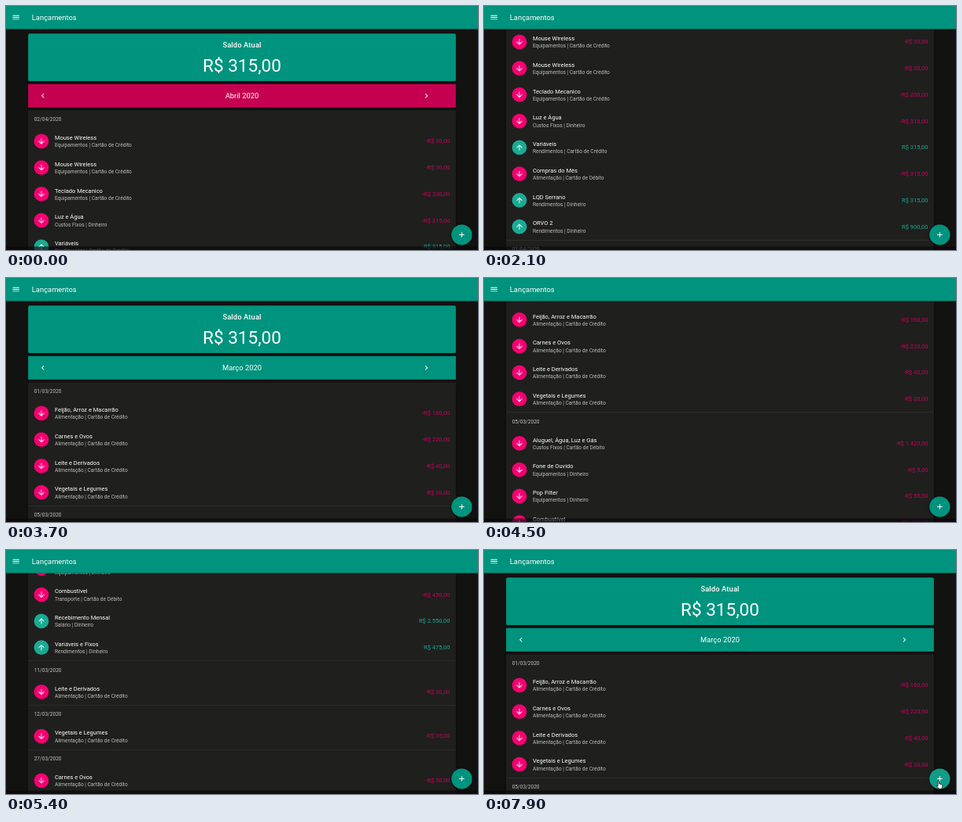
An HTML page for the animation above (8000 ms loop, 600x312 px).

```html
<!DOCTYPE html>
<html lang="pt-BR">
<head>
<meta charset="utf-8">
<title>Lançamentos</title>
<style>
  html, body { margin: 0; width: 100%; height: 100%; overflow: hidden; background: #121211; }
  #app { position: absolute; left: 0; top: 0; width: 1280px; height: 665.6px; overflow: hidden;
    transform: scale(.46875); transform-origin: 0 0; background: #121211;
    color: #fff; font: 16px/24px Roboto, Arial, sans-serif; }
  #app div, #app svg { position: absolute; white-space: nowrap; }
  svg { fill: #fff; width: 24px; height: 24px; }
  #page { left: 60px; top: 0; width: 1160px; }
  #page > div { left: 0; width: 1160px; }
  .teal { background: #00937e; }
  .panel { box-shadow: 0 3px 6px rgba(0,0,0,.45); }
  .mid { width: 100%; text-align: center; }
  #saldo { top: 75px; height: 130px; border-radius: 4px; }
  #bar { top: 212.5px; height: 64px; font-size: 20px; }
  .list { top: 284.5px; height: 1400px; background: #1f1f1e; }
  .date { left: 16px; font-size: 14px; color: rgba(255,255,255,.72); }
  .line { left: 0; width: 100%; height: 1px; background: rgba(255,255,255,.13); }
  .row { left: 0; width: 100%; height: 72px; }
  .dot { left: 16px; top: 16px; width: 40px; height: 40px; border-radius: 50%; background: #f50070; }
  .dot svg { left: 8px; top: 8px; }
  .name { left: 72px; top: 15.5px; }
  .kind { left: 72px; top: 35px; font-size: 14px; color: rgba(255,255,255,.7); }
  .sum { right: 16px; top: 24px; color: #c90059; }
  .in .dot { background: #1aab94; }
  .in .sum { color: #1aab94; }
  #halo { left: 16px; top: 8px; width: 48px; height: 48px; border-radius: 50%; background: rgba(255,255,255,.12); }
  #top { left: 0; top: 0; width: 1280px; height: 62.5px; box-shadow: 0 2px 6px rgba(0,0,0,.4); }
  #edge { left: 0; top: 656px; width: 1280px; height: 10px; background: rgba(12,6,8,.62); }
  #fab { left: 1208px; top: 595.5px; width: 56px; height: 56px; border-radius: 50%; box-shadow: 0 3px 8px rgba(0,0,0,.5); }
  #fab svg { left: 16px; top: 16px; }
  #app .cursor { width: 18px; height: 24px; overflow: visible; stroke-width: 1.4; stroke-linejoin: round; }
  #hand { fill: #fff; stroke: #000; }
  #arrow { fill: #000; stroke: #fff; }
</style>
</head>
<body>
<div id="app">
  <div id="page">
    <div id="saldo" class="teal panel">
      <div class="mid" style="top:20px;font-size:20px;font-weight:500;letter-spacing:.2px">Saldo Atual</div>
      <div class="mid" style="top:61px;font-size:48px;line-height:56px">R$ 315,00</div>
    </div>
    <div id="bar" class="panel">
      <div id="halo"></div>
      <svg style="left:28px;top:20px" viewBox="0 0 24 24"><path d="M15.4 7.4 14 6 8 12l6 6 1.4-1.4L10.8 12z"/></svg>
      <div id="month" class="mid" style="top:20px"></div>
      <svg style="left:1068px;top:20px" viewBox="0 0 24 24"><path d="M10 6 8.6 7.4l4.6 4.6-4.6 4.6L10 18l6-6z"/></svg>
    </div>
    <div id="april" class="list panel"></div>
    <div id="march" class="list panel"></div>
  </div>
  <div id="top" class="teal">
    <svg style="left:15px;top:19px" viewBox="0 0 24 24"><path d="M3 6h18v2H3zM3 11h18v2H3zM3 16h18v2H3z"/></svg>
    <div style="left:70px;top:19px;font-size:20px">Lançamentos</div>
  </div>
  <div id="edge"></div>
  <div id="fab" class="teal"><svg viewBox="0 0 24 24"><path d="M19 13h-6v6h-2v-6H5v-2h6V5h2v6h6z"/></svg></div>
  <svg id="arrow" class="cursor" viewBox="0 0 18 24"><path d="M1 1v17l4-4 3 7 3-1.3-3-6.7h6z"/></svg>
  <svg id="hand" class="cursor" viewBox="0 0 18 24"><path d="M5 13V3q0-2 1.6-2T8.2 3v6q3-1 3.4 1 2.4-.8 3 1 2.4-.4 2.4 2v4q0 3-2 5H7q-2-3-5.400-7.600 1-2.400 3.400.600z"/></svg>
</div>
<script>
const $ = id => document.getElementById(id);
const LOOP = 8000, STEP = 100, SCALE = .46875;
const CREDIT = 'Cartão de Crédito', DEBIT = 'Cartão de Débito', CASH = 'Dinheiro';
const GEAR = 'Equipamentos', FOOD = 'Alimentação', INCOME = 'Rendimentos', FIXED = 'Custos Fixos';

// Each entry: name, category, payment, amount; a lone string opens a new day.
const april = [
  '02/04/2020',
  ['Mouse Wireless', GEAR, CREDIT, '-R$ 30,00'],
  ['Mouse Wireless', GEAR, CREDIT, '-R$ 30,00'],
  ['Teclado Mecanico', GEAR, CREDIT, '-R$ 200,00'],
  ['Luz e Água', FIXED, CASH, '-R$ 315,00'],
  ['Variáveis', INCOME, CREDIT, 'R$ 315,00'],
  ['Compras do Mês', FOOD, DEBIT, '-R$ 315,00'],
  ['LQD Serrano', INCOME, CASH, 'R$ 315,00'],
  ['ORVO 2', INCOME, CASH, 'R$ 900,00'],
  '03/04/2020',
  ['Combustível', 'Transporte', DEBIT, '-R$ 315,00']
];
const march = [
  '01/03/2020',
  ['Feijão, Arroz e Macarrão', FOOD, CREDIT, '-R$ 160,00'],
  ['Carnes e Ovos', FOOD, CREDIT, '-R$ 220,00'],
  ['Leite e Derivados', FOOD, CREDIT, '-R$ 40,00'],
  ['Vegetais e Legumes', FOOD, CREDIT, '-R$ 20,00'],
  '05/03/2020',
  ['Aluguel, Água, Luz e Gás', FIXED, DEBIT, '-R$ 1.420,00'],
  ['Fone de Ouvido', GEAR, CASH, '-R$ 5,00'],
  ['Pop Filter', GEAR, CASH, '-R$ 55,00'],
  ['Combustível', 'Transporte', DEBIT, '-R$ 450,00'],
  ['Recebimento Mensal', 'Salário', CASH, 'R$ 2.550,00'],
  ['Variáveis e Fixos', INCOME, CASH, 'R$ 475,00'],
  '11/03/2020',
  ['Leite e Derivados', FOOD, CREDIT, '-R$ 30,00'],
  '12/03/2020',
  ['Vegetais e Legumes', FOOD, CREDIT, '-R$ 35,00'],
  '27/03/2020',
  ['Carnes e Ovos', FOOD, CREDIT, '-R$ 50,00'],
  ['Leite e Derivados', FOOD, CREDIT, '-R$ 30,00']
];

const DOWN = 'M20 12l-1.400-1.400L13 16.200V4h-2v12.200l-5.600-5.600L4 12l8 8z';

function fill(list, entries) {
  let y = 0;
  list.innerHTML = entries.map(e => {
    const top = y;
    if (typeof e === 'string') {
      const gap = top ? 1 : 0;
      y += 48 + gap;
      return (gap ? `<div class="line" style="top:${top}px"></div>` : '') +
        `<div class="date" style="top:${top + gap + 12}px">${e}</div>`;
    }
    y += 72;
    const [name, kind, pay, sum] = e, income = sum[0] !== '-';
    return `<div class="row ${income ? 'in' : ''}" style="top:${top}px">
      <div class="dot"><svg viewBox="0 0 24 24"><path d="${DOWN}" ${income ? 'transform="rotate(180 12 12)"' : ''}/></svg></div>
      <div class="name">${name}</div><div class="kind">${kind} | ${pay}</div><div class="sum">${sum}</div></div>`;
  }).join('');
}
fill($('april'), april);
fill($('march'), march);

// Keys: time, then values in stage pixels.
const scrollKeys = [
  [400, 0], [500, 45], [600, 105], [700, 140], [800, 150], [2000, 150],
  [2100, 127], [2200, 74], [2300, 30], [2400, 8], [2500, 0], [4200, 0],
  [4500, 119.5], [5000, 292.7], [5400, 375], [6600, 375],
  [6700, 338.2], [6800, 190], [6900, 60], [7000, 0]
];
const pathKeys = [
  [2600, 210, 185], [2900, 75, 132], [3000, 55, 119], [3100, 46.5, 113.500], [3400, 46.5, 113.500],
  [3600, 150, 190], [7400, 582, 191], [7600, 580, 258], [7700, 579, 285], [7900, 577.5, 295]
];

function at(keys, t) {
  const i = keys.findIndex(k => k[0] > t);
  if (i === 0) return keys[0].slice(1);
  if (i < 0) return keys[keys.length - 1].slice(1);
  const a = keys[i - 1], b = keys[i], p = (t - a[0]) / (b[0] - a[0]);
  return a.slice(1).map((v, n) => v + (b[n + 1] - v) * p);
}
const within = (t, from, to) => t >= from && t < to;
const show = (el, on) => { el.style.visibility = on ? 'visible' : 'hidden'; };

function draw(t) {
  const isMarch = t >= 3400;
  $('page').style.transform = `translateY(${-at(scrollKeys, t)[0] / SCALE}px)`;
  $('month').textContent = isMarch ? 'Março 2020' : 'Abril 2020';
  $('bar').style.background = isMarch ? '#00937e' : '#c60050';
  show($('april'), !isMarch);
  show($('march'), isMarch);
  show($('halo'), within(t, 3000, 3500));
  $('fab').style.background = t >= 7700 ? '#129c88' : '#00937e';

  const [x, y] = at(pathKeys, t);
  const hand = within(t, 3000, 3500) || t >= 7700;
  const arrow = within(t, 2600, 3000) || within(t, 3500, 3700) || within(t, 7400, 7700);
  for (const [id, on] of [['hand', hand], ['arrow', arrow]]) {
    const el = $(id);
    show(el, on);
    el.style.left = x / SCALE - (id === 'hand' ? 6 : 1) + 'px';
    el.style.top = y / SCALE + 'px';
  }
}

const start = performance.now();
function tick() {
  const t = (performance.now() - start) % LOOP;
  draw(Math.floor(t / STEP) * STEP);
  requestAnimationFrame(tick);
}
tick();
</script>
</body>
</html>
```
